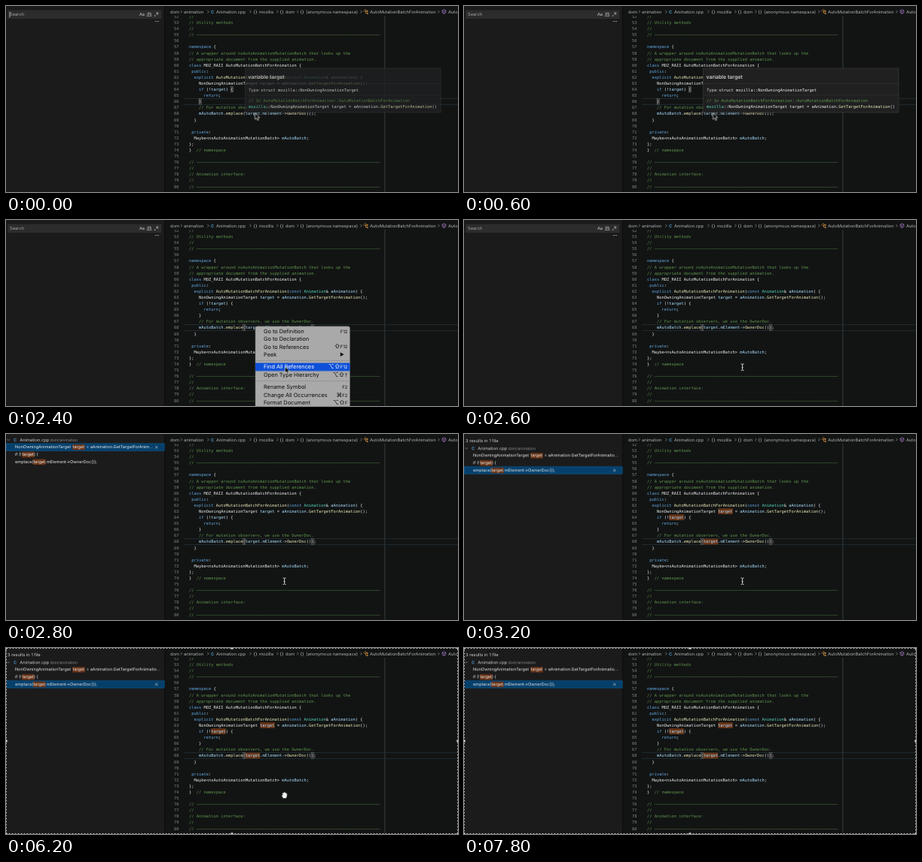
Animation, 600 px wide and 248 px high, one loop 8000 ms. Source, as an HTML page:

```html
<!DOCTYPE html>
<html lang="en">
<head>
<meta charset="utf-8">
<title>Find all references</title>
<style>
html, body { margin: 0; width: 100%; height: 100%; overflow: hidden; background: #121414; }
svg { display: block; width: 600px; height: 248px; }
text { font: 5.75px Inter, "DejaVu Sans", sans-serif; fill: #cecece; white-space: pre; text-rendering: geometricPrecision; }
.mono { font: 5.4px "DejaVu Sans Mono", monospace; fill: #ececec; }
.num { fill: #828282; text-anchor: end; }
.com { fill: #5f954c; }
.kw { fill: #63aae3; }
.type { fill: #55d3b8; }
.fn { fill: #e8e8b6; }
.var { fill: #a8defc; }
.crumb { fill: #b0b0b0; }
.ref { font-size: 5.6px; fill: #eaeaea; }
.mark { fill: #6a3417; }
.pair { fill: #2a2a2a; stroke: #777; stroke-width: .5; }
.current { stroke: #26363a; stroke-width: .7; }
.line { fill: none; stroke: #b0b0b0; stroke-width: .6; }
.menu text { font-size: 7.35px; fill: #0c0c0c; }
.menu .key { font-size: 6px; text-anchor: end; }
.menu .sym { font-size: 7.8px; }

/* One loop is 40 steps of 2.5% */
.anim { animation: 8s step-end infinite; }
.tip { animation-name: tip; }
.menu { animation-name: menu; }
.search { animation-name: search; }
.caret { animation-name: caret; }
.refs { animation-name: refs; }
.slide { animation-name: slide; }
.pick { animation-name: pick; }
.early { animation-name: early; }
.late { animation-name: late; }
.hover { animation-name: hover; }
.menu .peek { animation-name: peek; }
.menu .find { animation-name: find; }
.arrow { animation-name: arrow; }
.first { animation-name: first; }
.second { animation-name: second; }
.ibeam { animation-name: ibeam; }
.hand { animation-name: hand; }
.frame { animation-name: frame; }
@keyframes tip { 0% { opacity: .78 } 2.5% { opacity: 1 } 10%, 100% { opacity: 0 } }
@keyframes menu { 0% { opacity: 0 } 10% { opacity: 1 } 32.5%, 100% { opacity: 0 } }
@keyframes search { 0% { opacity: 1 } 35%, 100% { opacity: 0 } }
@keyframes caret { 0% { opacity: 1 } 7.5%, 100% { opacity: 0 } }
@keyframes refs { 0% { opacity: 0 } 35%, 100% { opacity: 1 } }
@keyframes slide { 0% { transform: translateY(-11.2px) } 37.5%, 100% { transform: none } }
@keyframes pick { 0% { transform: none } 37.5%, 100% { transform: translateY(19.6px) } }
@keyframes early { 0% { opacity: 1 } 37.5%, 100% { opacity: 0 } }
@keyframes late { 0% { opacity: 0 } 37.5%, 100% { opacity: 1 } }
@keyframes hover {
  0% { opacity: 0 } 15% { opacity: 1; transform: none }
  25%, 100% { opacity: 1; transform: translateY(16.6px) }
}
@keyframes peek { 0% { fill: #0c0c0c } 15% { fill: #fff } 25%, 100% { fill: #0c0c0c } }
@keyframes find { 0% { fill: #0c0c0c } 25%, 100% { fill: #fff } }
@keyframes arrow {
  0% { transform: translate(330.5px, 142.5px) }
  12.5% { transform: translate(338px, 152px) }
  15% { transform: translate(354px, 173px) }
  17.5% { transform: translate(362px, 178px) }
  20% { transform: translate(363px, 179px) }
  25% { transform: translate(369px, 191px) }
  27.5% { transform: translate(370.5px, 195.5px) }
  32.5%, 100% { opacity: 0 }
}
@keyframes first { 0% { opacity: 1 } 10%, 100% { opacity: 0 } }
@keyframes second { 0% { opacity: 0 } 10%, 100% { opacity: 1 } }
@keyframes ibeam { 0% { opacity: 0 } 32.5% { opacity: 1 } 77.5%, 100% { opacity: 0 } }
@keyframes hand { 0% { opacity: 0 } 77.5% { opacity: 1 } 85%, 100% { opacity: 0 } }
@keyframes frame { 0% { opacity: 0 } 77.5%, 100% { opacity: 1 } }
</style>
</head>
<body>
<svg viewBox="0 0 600 248">
  <rect width="600" height="248" fill="#121414"/>
  <path d="M502.9 13V248" stroke="#3a4343" stroke-width=".9"/>
  <g id="marks"></g>
  <g id="code"></g>
  <rect x="211" width="389" height="13" fill="#121414"/>
  <g id="crumbs"></g>
  <rect width="210" height="248" fill="#1b1b1c"/>
  <path d="M210.5 0V248" stroke="#0c0c0c"/>

  <g class="anim search">
    <rect x="2" y="5.5" width="204.5" height="11.5" fill="#2c2c2d"/>
    <text x="5" y="13.1" style="fill:#a5a5a5">Search</text>
    <path class="anim caret" d="M5 7.5V15" stroke="#ddd" stroke-width=".7"/>
    <text x="177" y="13" style="font-size:5.6px">Aa</text>
    <g class="line">
      <path d="M187 13.5h6v-1.2M187 13.5v-1.2M188 9h1.5v3h-1.5zM191 8v4h1.6v-2.3h-1.6"/>
      <path d="M200.8 7.8v4.2M199 8.8l3.6 2.2M202.6 8.8l-3.6 2.2"/>
      <path d="M197 13h1.3" stroke-width="1.3"/>
    </g>
    <path d="M198 20.5h5" stroke="#b5b5b5" stroke-dasharray="1 1"/>
  </g>

  <g class="anim refs">
    <text class="anim late" x="2" y="10.5">3 results in 1 file</text>
    <g class="anim slide">
      <path class="line" d="M1.5 18.2l1.6 1.7 1.6-1.7"/>
      <text x="10" y="21.2" style="font-weight:700;fill:#4c8fb8">C</text>
      <text x="18.2" y="21.1">Animation.cpp</text>
      <text x="58.5" y="21" style="font-size:5.2px;fill:#8c8c8c">dom/animation</text>
      <g class="anim pick">
        <rect x=".3" y="24" width="209.8" height="9.6" fill="#053f6b" stroke="#0c69a8" stroke-width=".6"/>
        <path class="line" d="M198 27.2l3.4 3.4m0-3.4l-3.4 3.4" style="stroke:#e4e4e4"/>
      </g>
      <g id="rows"></g>
    </g>
  </g>

  <g class="anim tip">
    <rect x="317.5" y="83" width="259.5" height="59" fill="#202021" stroke="#3d3d3d" stroke-width=".6"/>
    <path d="M318 103.5H577M318 119H577" stroke="#353535" stroke-width=".6"/>
    <text x="321.5" y="97.4" style="font-size:6.9px;font-weight:600">variable target</text>
    <text x="322" y="113.6">Type:</text>
    <text class="mono" x="338.3" y="113.6">struct mozilla::NonOwningAnimationTarget</text>
    <text class="mono com" x="322" y="128.3">// In AutoMutationBatchForAnimation::AutoMutationBatchForAnimation</text>
    <text class="mono" x="322" y="136.4"><tspan class="type">mozilla</tspan>::NonOwningAnimationTarget target = aAnimation.<tspan class="fn">GetTargetForAnimation</tspan>()</text>
  </g>

  <g class="anim menu">
    <rect x="331" y="141.7" width="125.5" height="115" rx="2.5" fill="#a9a9a9" stroke="#6a6a6a" stroke-width=".5"/>
    <rect class="anim hover" x="331" y="174" width="125.5" height="10.7" fill="#0d50d8"/>
    <path d="M331 187.6h125.5M331 214.7h125.5" stroke="#929292" stroke-width=".9"/>
    <g id="items"></g>
    <path class="anim peek" d="M443.8 176.6l4.8 2.7-4.8 2.7z"/>
  </g>

  <path class="anim arrow" d="M0 0V8.6L2 6.8 3.5 10 5 9.3 3.6 6.2H6.3Z" fill="#080808" stroke="#eee" stroke-width=".7"/>
  <path class="anim ibeam" d="M367.6 191.8q1.7 0 2 1.2q.3-1.2 2-1.2M369.6 193v6.5M367.6 200.7q1.7 0 2-1.2q.3 1.2 2 1.2M368.6 196.8h2" fill="none" stroke="#e6e6e6" stroke-width=".9"/>
  <path class="anim hand" d="M367.8 200.5l-2.2-4q.4-1 1.5.1l-.4-3.2q.9-1 1.5.2l.3-1.3q1-.8 1.5.2l1.4.3.4.8q1.4-.2 1.4 1v2.6l-1.2 3.3z" fill="#f2f2f2" stroke="#111" stroke-width=".5"/>

  <g class="anim frame">
    <rect x=".5" y=".5" width="599" height="247" fill="none" stroke="#111"/>
    <rect x=".5" y=".5" width="599" height="247" fill="none" stroke="#b8b8b8" stroke-dasharray="2 2"/>
    <g id="grips" fill="#ddd" stroke="#333" stroke-width=".5"></g>
  </g>
</svg>
<script>
const CHAR = 3.2508, LEFT = 243;
const lineY = n => 22.2 + 8.09 * (n - 53);
const colX = c => LEFT + c * CHAR;
const esc = s => s.replace(/&/g, "&amp;").replace(/</g, "&lt;").replace(/>/g, "&gt;");
const put = (id, html) => { document.getElementById(id).innerHTML = html; };
const text = (x, y, s, cls = "") => `<text class="${cls}" x="${x}" y="${y}">${s}</text>`;
const box = (x, y, w, h, cls) => `<rect class="${cls}" x="${x}" y="${y}" width="${w}" height="${h}"/>`;

const rule = "// " + "–".repeat(75);
const lines = [
  "//", "// Utility methods", "//", rule, "",
  "namespace {",
  "// A wrapper around nsAutoAnimationMutationBatch that looks up the",
  "// appropriate document from the supplied animation.",
  "class MOZ_RAII AutoMutationBatchForAnimation {",
  " public:",
  "  explicit AutoMutationBatchForAnimation(const Animation& aAnimation) {",
  "    NonOwningAnimationTarget target = aAnimation.GetTargetForAnimation();",
  "    if (!target) {",
  "      return;",
  "    }",
  "    // For mutation observers, we use the OwnerDoc.",
  "    mAutoBatch.emplace(target.mElement->OwnerDoc());",
  "  }", "",
  " private:",
  "  Maybe<nsAutoAnimationMutationBatch> mAutoBatch;",
  "};",
  "}  // namespace", "",
  rule, "//", "// Animation interface:", "//", rule
];

const kinds = [
  ["com", /^\/\/.*/],
  ["kw", /^(namespace|class|public|private|explicit|const|if|return)\b/],
  ["type", /^Animation\b/],
  ["fn", /^(AutoMutationBatchForAnimation(?=\()|GetTargetForAnimation|emplace|OwnerDoc)\b/],
  ["var", /^(aAnimation|mAutoBatch|target|mElement)\b/],
  ["", /^(\w+|\s+|.)/]
];
function paint(s) {
  let out = "";
  while (s) {
    const [cls, re] = kinds.find(k => k[1].test(s));
    const token = s.match(re)[0];
    out += cls ? `<tspan class="${cls}">${esc(token)}</tspan>` : esc(token);
    s = s.slice(token.length);
  }
  return out;
}
put("code", lines.map((s, i) => {
  const y = lineY(52 + i) + 1.9;
  return text(229.5, y, 52 + i, "mono num") + text(LEFT, y, paint(s), "mono");
}).join(""));

const mark = (n, col, len, cls) => box(colX(col), lineY(n) - 3.9, CHAR * len, 7.7, cls);
const current = n => `<path class="current" d="M236 ${lineY(n) - 4}H600M236 ${lineY(n) + 4}H600"/>`;
put("marks",
  `<g class="anim first">${current(66)}${mark(64, 17, 1, "pair")}${mark(66, 4, 1, "pair")}</g>` +
  `<g class="anim second">${current(68)}${mark(68, 22, 1, "pair")}${mark(68, 50, 1, "pair")}</g>` +
  `<g class="anim late">${[[63, 29], [64, 9], [68, 23]].map(([n, c]) => mark(n, c, 6, "mark")).join("")}</g>`);

const crumbs = [
  [218, "dom"], [236, "animation"], [279, "Animation.cpp"], [336, "mozilla"], [371, "dom"],
  [398.3, "(anonymous namespace)"], [483, "AutoMutationBatchForAnimation"], [587, "AutoMutationBatch"]
];
put("crumbs",
  crumbs.map(([x, s]) => text(x, 9.6, s, "crumb")).join("") +
  [328.5, 363.5, 390.5].map(x => text(x, 9.5, "{}")).join("") +
  [232, 267.5, 323.5, 359.5, 386.5, 470.5, 573.5].map(x =>
    `<path class="line" d="M${x} 5.8l1.6 1.8-1.6 1.8"/>`).join("") +
  `<text x="272" y="9.7" style="font-weight:700;fill:#4c8fb8">C</text>
   <path d="M475 6.5l2-2 1.5 1.5-2 2zM477.5 6.8h2M477.5 6.8v3h2M479.5 6l1.3.9-1.3.9zM479.5 9l1.3.9-1.3.9z" fill="none" stroke="#d9963f" stroke-width=".7"/>
   <path d="M579 6l2.4-1.4 2.4 1.4v3l-2.4 1.4-2.4-1.4zM579 6l2.4 1.4 2.4-1.4M581.4 7.4v3" fill="none" stroke="#a77ac4" stroke-width=".7"/>`);

const ref = (y, before, x, after) =>
  box(x - .2, y - 3.8, 16.4, 7.6, "mark") + text(12, y + 1.9, before, "ref") +
  text(x, y + 1.9, `target${after}`, "ref");
const tail = (s, cls) => text(106.4, 30.7, `= aAnimation.GetTargetFor${s}...`, "anim ref " + cls);
put("rows",
  ref(28.8, "NonOwningAnimationTarget", 88.6, "") + tail("Anim", "early") + tail("Animatio", "late") +
  ref(38.7, "if (!", 21.4, ") {") +
  ref(48.5, "emplace(", 36.5, ".mElement-&gt;OwnerDoc());"));

const items = [
  [148.4, "Go to Definition", "", "F12"], [158.7, "Go to Declaration", "", ""], [168.9, "Go to References", "⇧", "F12"],
  [179.2, "Peek", "", "", "anim peek"], [195.8, "Find All References", "⌥⇧", "F12", "anim find"],
  [206.2, "Open Type Hierarchy", "⌥⇧", "T"], [222.7, "Rename Symbol", "", "F2"],
  [233.1, "Change All Occurrences", "⌘", "F2"], [243.4, "Format Document", "⌥⇧", "F"]
];
put("items", items.map(([y, s, sym, key, cls = ""]) =>
  text(342, y + 2.6, s, cls) +
  text(453.5, y + 2.5, `<tspan class="sym">${sym}</tspan>${key}`, "key " + cls)).join(""));

put("grips", [0, 300, 600].flatMap(x => [0, 124, 248].map(y =>
  x === 300 && y === 124 ? "" : `<circle cx="${x}" cy="${y}" r="2"/>`)).join(""));
</script>
</body>
</html>
```
